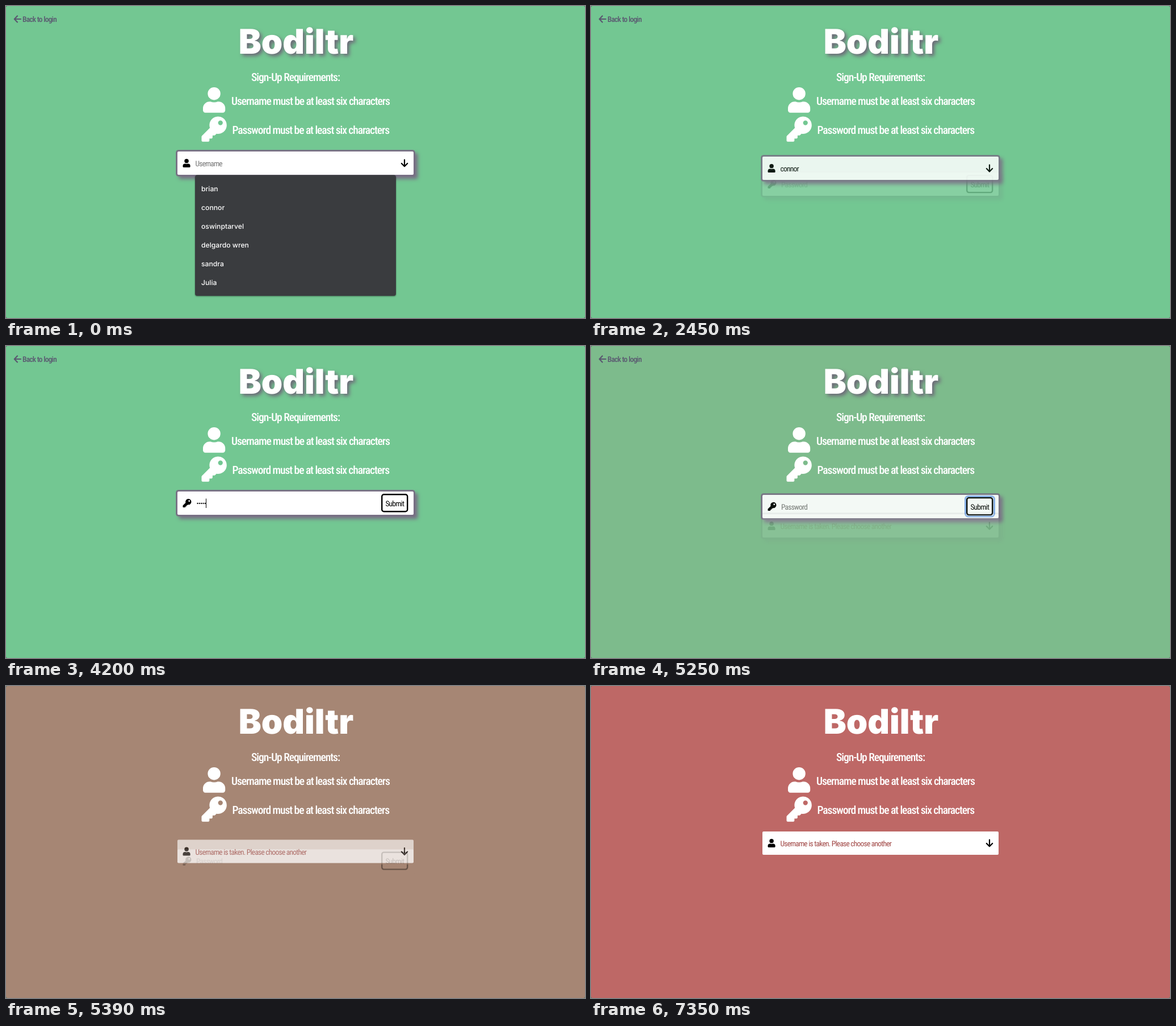
Write an HTML page that moves like this. It is 1020x549 px and loops after 7630 ms.

```html
<!DOCTYPE html>
<html lang="en">
<head>
<meta charset="utf-8">
<title>Sign-up form</title>
<style>
  html, body { margin: 0; height: 100%; overflow: hidden; background: #55806a; }
  svg { display: block; width: 1020px; height: 549px; border-radius: 3px; --u: 20px; --accent: #786f84; }
  text { font: 500 var(--u) "Roboto Condensed", Roboto, "Liberation Sans", sans-serif;
         font-stretch: condensed; letter-spacing: -.055em; fill: #fff; text-rendering: geometricPrecision; }
  .small { font-size: calc(var(--u) * .685); font-weight: 400; fill: #000; }
  .hint { fill: #757575; }
  .title { font: 900 60px Inter, Roboto, sans-serif; letter-spacing: 0; text-anchor: middle;
           filter: drop-shadow(4px 4px 3px #6d6a78); }
  .back text { fill: #5a5870; font-weight: 500; }
  .back path { stroke: #5a5870; }
  .arrow { fill: none; stroke: #000; stroke-width: 2.2; stroke-linecap: round; stroke-linejoin: round; }
  .edge { fill: none; stroke: var(--accent); stroke-width: 2.5; }
  .shade { fill: var(--accent); filter: drop-shadow(5px 5px 3px var(--accent)); }
  .flat .title { filter: none; }
  .flat .back, .flat .shade, .flat #ring { display: none; }
  .flat .edge { stroke: var(--bg); }
  #menu rect { fill: #3a3c3f; filter: drop-shadow(0 1px 1px #0006); }
  #menu text { font: 500 12.2px Inter, Roboto, sans-serif; letter-spacing: 0; }
</style>
</head>
<body>
<svg id="stage" viewBox="0 0 1020 549">
  <defs>
    <path id="person" d="M224 256A128 128 0 1 0 224 0A128 128 0 1 0 224 256ZM314 288H297Q224 320 151 288H134A134 134 0 0 0 0 422V464A48 48 0 0 0 48 512H400A48 48 0 0 0 448 464V422A134 134 0 0 0 314 288Z"/>
    <path id="key" fill-rule="evenodd" d="M512 176A176 176 0 0 1 303 349L279 376A24 24 0 0 1 261 384H224V424A24 24 0 0 1 200 448H160V488A24 24 0 0 1 136 512H24A24 24 0 0 1 0 488V410Q0 400 7 393L169 231A176 176 0 1 1 512 176ZM336 128A48 48 0 1 0 432 128A48 48 0 1 0 336 128Z"/>
    <g id="frame">
      <rect class="shade" x="299.5" y="253.5" width="421" height="46" rx="4"/>
      <rect class="edge" x="300.75" y="254.75" width="418.5" height="43.5" rx="3"/>
    </g>
  </defs>
  <rect id="back" width="1020" height="549"/>
  <g class="back">
    <path class="arrow" d="M26 23H15M20 17.5L14.8 23L20 28.5"/>
    <text class="small" x="29" y="28">Back to login</text>
  </g>
  <text class="title" x="511" y="83.5">Bodiltr</text>
  <text x="432" y="131.5">Sign-Up Requirements:</text>
  <use href="#person" fill="#fff" transform="translate(347 143) scale(.0875)"/>
  <text id="sample" x="397" y="174">Username must be at least six characters</text>
  <use href="#key" fill="#fff" transform="translate(344.5 194.5) scale(.0866)"/>
  <text x="398.5" y="225">Password must be at least six characters</text>

  <g id="pass">
    <use href="#frame"/>
    <rect id="passFill" x="302" y="256" width="416" rx="2" fill="#fff"/>
    <use href="#key" transform="translate(311.5 269) scale(.0293)"/>
    <text id="passHint" class="small hint" x="335" y="282">Password</text>
    <path id="dots" fill="none" stroke="#000" stroke-width="2.3" stroke-linecap="round" stroke-dasharray="0 3.3"/>
    <rect id="ring" x="659.5" y="258.5" width="51" height="35.5" rx="5" fill="none" stroke="#8aafee" stroke-width="3"/>
    <rect x="662.2" y="261.2" width="45" height="30" rx="3.5" fill="none" stroke="#000" stroke-width="2.4"/>
    <text class="small" x="684.8" y="282" text-anchor="middle">Submit</text>
  </g>
  <g id="user">
    <use href="#frame"/>
    <rect x="302" y="256" width="416" height="41" rx="2" fill="#fff"/>
    <use href="#person" transform="translate(311.5 269) scale(.0293)"/>
    <text id="name" class="small" x="333.5" y="282"></text>
    <path class="arrow" d="M702 270.5V282M696.8 277L702 282.3L707.2 277"/>
  </g>
  <rect id="caret" y="268.5" width="1" height="16.5"/>
  <g id="menu"><rect x="333" y="297.5" width="354" rx="4"/></g>
</svg>
<script>
const LOOP = 7630, STEP = 70, SLIDE = 46;
const $ = id => document.getElementById(id);
const show = (el, on) => el.style.display = on ? '' : 'none';
const count = (times, t) => times.filter(at => t >= at).length;

const LOGIN = 'connor', LOGIN_KEYS = [70, 280, 420, 560, 700, 840];
const PASS_KEYS = [3850, 3920, 3920, 3990, 4200, 4340];
const ALL = ['brian', LOGIN, 'oswinptarvel', 'delgardo wren', 'sandra', 'Julia'];
const MATCHES = [LOGIN, 'Connor'];
const GREEN = [115, 199, 146], RED = [190, 104, 102];

// One type size for the page, taken from the longest line.
$('stage').style.setProperty('--u', 20 * 279 / $('sample').getComputedTextLength() + 'px');

const rows = ALL.map((_, i) => {
  const row = document.createElementNS('http://www.w3.org/2000/svg', 'text');
  row.setAttribute('x', 344);
  row.setAttribute('y', 326 + 33 * i);
  return $('menu').appendChild(row);
});

// The CSS "ease" curve.
function ease(x) {
  if (x <= 0) return 0;
  if (x >= 1) return 1;
  const curve = (s, a, b) => 3 * (1 - s) ** 2 * s * a + 3 * (1 - s) * s * s * b + s ** 3;
  let lo = 0, hi = 1;
  for (let i = 0; i < 24; i++) {
    const mid = (lo + hi) / 2;
    if (curve(mid, .25, .25) < x) lo = mid; else hi = mid;
  }
  return curve(lo, .1, 1);
}

function drawMenu(t) {
  const items = t < 140 ? ALL : MATCHES;
  show($('menu'), t < 2380);
  $('menu').firstElementChild.setAttribute('height', 14.5 + 33 * items.length);
  rows.forEach((row, i) => row.textContent = items[i] || '');
}

function drawCaret(t, dots) {
  const typing = t >= 70 && t < 2372;
  const x = typing ? 334 + $('name').getComputedTextLength() : 335.5 + 3.3 * dots;
  const on = typing ? t < 1330 || (t >= 1820 && t < 2310)
                    : t >= 2900 && t < 4760 && !(t >= 3500 && t < 3850);
  $('caret').setAttribute('x', x);
  show($('caret'), on);
}

function draw(t) {
  const failed = t >= 5190, flat = t >= 5355;
  const p = ease((t - (failed ? 5190 : 2372)) / 500);
  const q = failed ? 1 - p : p;
  const fade = p ** 1.2, passAlpha = failed ? 1 - fade : fade;
  const userY = SLIDE * q, passY = SLIDE * (1 - q);

  const bg = `rgb(${GREEN.map((c, i) => c + (RED[i] - c) * (failed ? p : 0))})`;
  $('back').setAttribute('fill', bg);
  $('stage').style.setProperty('--bg', bg);
  $('stage').classList.toggle('flat', flat);

  const place = (id, y, alpha) => {
    $(id).setAttribute('transform', `translate(0 ${y})`);
    $(id).setAttribute('opacity', alpha);
    show($(id), alpha > 0);
  };
  place('user', userY, 1 - passAlpha);
  place('pass', passY, passAlpha);
  $('passFill').setAttribute('height', flat ? Math.max(0, 41 - Math.max(0, passY - userY)) : 41);

  const typed = LOGIN.slice(0, count(LOGIN_KEYS, t));
  $('name').textContent = failed ? 'Username is taken. Please choose another' : typed || 'Username';
  $('name').style.fill = failed ? '#a04644' : typed ? '#000' : '#757575';

  const dots = failed ? 0 : count(PASS_KEYS, t);
  show($('passHint'), !dots);
  show($('dots'), dots);
  $('dots').setAttribute('d', `M337.5 277h${Math.max(0, dots - 1) * 3.3 + .1}`);
  show($('ring'), t >= 4760);

  drawMenu(t);
  drawCaret(t, dots);
}

const start = performance.now();
function tick() {
  const t = (performance.now() - start) % LOOP;
  draw(Math.floor(t / STEP) * STEP);
  requestAnimationFrame(tick);
}
tick();
</script>
</body>
</html>
```
